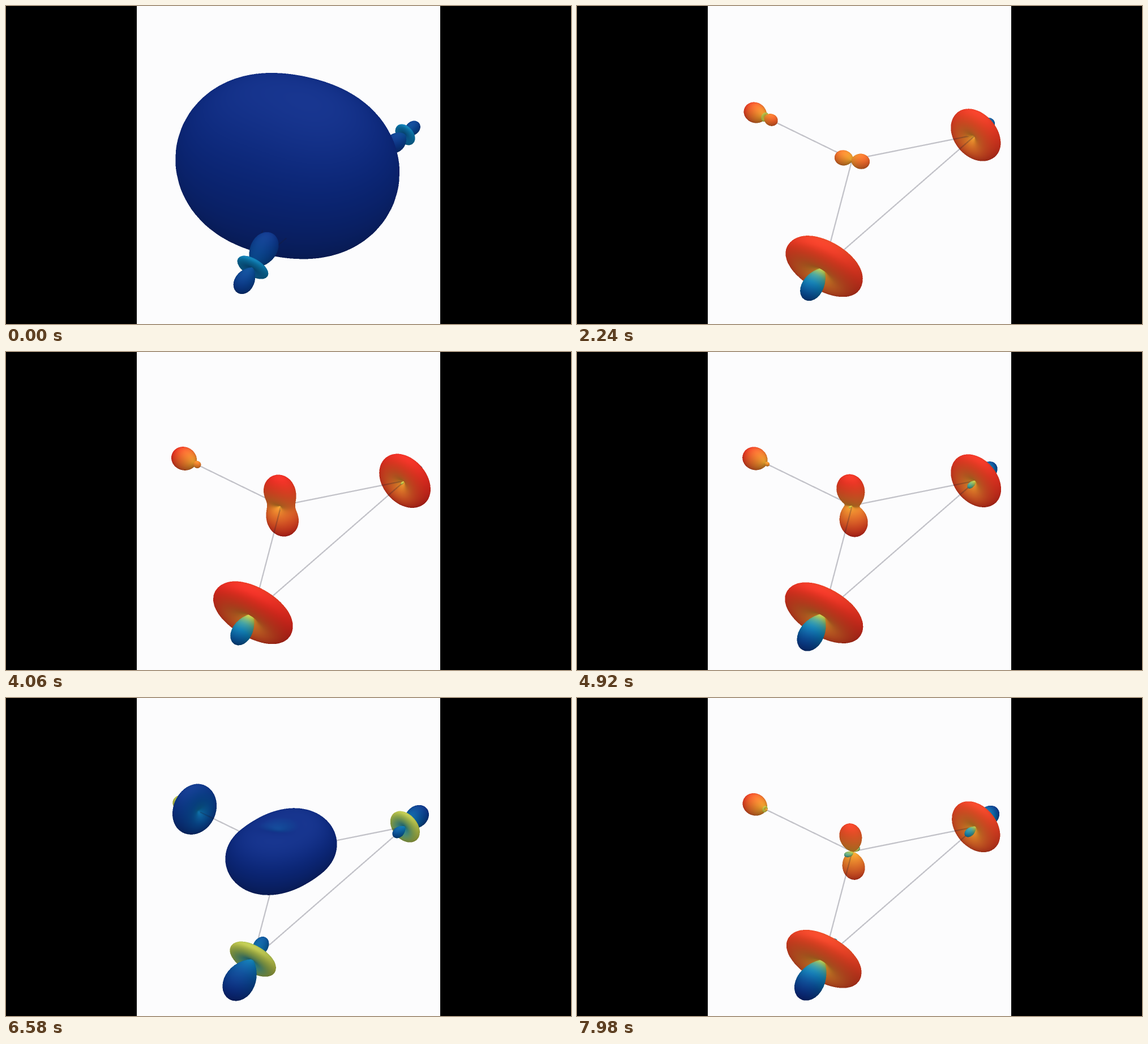
Animation, 998 px wide and 561 px high, one loop 8000 ms. Source, as an HTML page with a canvas:

```html
<!DOCTYPE html>
<html lang="en">
<head>
<meta charset="utf-8">
<title>Surface glyphs</title>
<style>
html, body { margin: 0; width: 100%; height: 100%; overflow: hidden; background: #000; }
canvas { display: block; width: 998px; height: 561px; }
</style>
</head>
<body>
<canvas id="stage" width="998" height="561"></canvas>
<script>
const LOOP = 8000, SS = 2, LEFT = 231, W = 536 * SS, H = 561 * SS;
const ctx = document.getElementById('stage').getContext('2d');
const buf = document.createElement('canvas');
buf.width = W;
buf.height = H;
const bctx = buf.getContext('2d');
const image = bctx.createImageData(W, H);
const px = image.data, px32 = new Uint32Array(px.buffer);
const depth = new Float32Array(W * H);

const dot = (a, b) => a[0] * b[0] + a[1] * b[1] + a[2] * b[2];
const unit = a => a.map(v => v / Math.hypot(...a));
const cross = (a, b) => [a[1] * b[2] - a[2] * b[1], a[2] * b[0] - a[0] * b[2], a[0] * b[1] - a[1] * b[0]];
const mix = (a, b, k) => a + (b - a) * k;
const ramp = (x, a, b) => Math.min(1, Math.max(0, (x - a) / (b - a)));

function basis(axis, side) {
  const u = unit(axis), k = dot(u, side);
  const v = unit(side.map((s, i) => s - k * u[i]));
  return [u, v, cross(u, v)];
}

// Pose: warmth | long and short lobe of the outer pair | left: outer, inner, ring | centre: three axes
const swollen = [.25, .7, .92, -10, -10, -11, -162, -210, -157];
const split = [.88, 1.09, 0, 48, 40, -20, -58, 28, 2];
const ringed = [1, .69, 0, 53, 22, 3, 57, 42, 5];
const warm = [.95, 1.09, .56, 53, 8, -3, 60, 8, -14];
const cold = [.5, 1.09, .6, 53, -12, -46, -42, -86, -106];
const CHANGES = [[17, 29, split], [29, 67, ringed], [67, 117, warm], [106, 125, cold], [157, 172, warm]];

function poseAt(step) {
  const pose = CHANGES.reduce((p, [a, b, next]) => p.map((v, i) => mix(v, next[i], ramp(step, a, b))), swollen);
  const late = ramp(step, 125, 157) * (1 - ramp(step, 157, 172));
  const grow = 1 + .02 * ramp(step, 0, 17) * (1 - ramp(step, 17, 29)) + .1 * late;
  const [heat, long, short, outer, inner, disc, ...axes] = pose;
  return { heat: heat - .04 * late, long, short, side: [outer, inner, disc, disc], core: axes.map(v => v * grow) };
}

// Each shape gives the values along +axis 1, -axis 1, axis 2 and axis 3
const ringSize = (g, heat) => g.size * (.18 + .8 * heat);
function pairShape(g, p) {
  const ring = ringSize(g, p.heat);
  return [-p.long * g.size, -p.short * g.size, ring, ring];
}
const left = {
  at: [332, 196, -100], size: 48, axes: basis([-.62, -.28, -.73], [0, 1, 0]), shape: (g, p) => p.side
};
const centre = {
  at: [486, 271, 0], size: 57, axes: basis([-.09, -.9, .42], [.83, .24, .5]),
  shape: (g, p) => [p.core[0], ...p.core],
  drift: p => .1 * Math.max(0, -p.core[0] - 50)
};
const right = {
  at: [705, 227, -60], size: 55, axes: basis([.59, -.5, -.63], [0, 1, 0]), shape: pairShape
};
const bottom = {
  at: [436, 461, 160], size: 80, axes: basis([-.47, .79, .4], [1, 0, 0]), shape: pairShape
};
const glyphs = [left, centre, right, bottom];
const bonds = [[left, centre], [centre, right], [centre, bottom], [bottom, right]];

const SCALE = [
  [0, 12, 42, 132], [.12, 8, 75, 150], [.25, 12, 125, 180], [.36, 70, 160, 150], [.45, 160, 190, 85],
  [.5, 208, 204, 70], [.6, 245, 165, 45], [.8, 242, 105, 42], [1, 236, 36, 30]
];
function colour(c) {
  let i = 1;
  while (i < SCALE.length - 1 && SCALE[i][0] < c) i++;
  const a = SCALE[i - 1], b = SCALE[i], k = ramp(c, a[0], b[0]);
  return [mix(a[1], b[1], k), mix(a[2], b[2], k), mix(a[3], b[3], k)];
}

// Unit directions of a latitude / longitude grid
const ROWS = 52, COLS = 72, STRIDE = 6;
const dirs = [];
for (let i = 0; i <= ROWS; i++) {
  for (let j = 0; j <= COLS; j++) {
    const th = Math.PI * i / ROWS, ph = 2 * Math.PI * j / COLS;
    dirs.push([Math.cos(th), Math.sin(th) * Math.cos(ph), Math.sin(th) * Math.sin(ph)]);
  }
}
const verts = new Float32Array(dirs.length * STRIDE);
const LIGHT = [0, -.75, .66];

function drawGlyph(g, pose) {
  const [p, q, m, n] = g.shape(g, pose);
  const { heat } = pose, zero = .6 * heat;
  const high = ringSize(g, heat), low = 1.09 * g.size;
  const drift = g.drift ? g.drift(pose) : 0;
  const [u, v, w] = g.axes;
  const toWorld = (a, b, c, i) => a * u[i] + b * v[i] + c * w[i];
  dirs.forEach(([a, b, c], i) => {
    const l = a > 0 ? p : q;
    const f = l * a * a + m * b * b + n * c * c;
    const r = Math.abs(f), s = f < 0 ? -2 : 2;
    // normal of r = |f|: r times the direction minus the tangential gradient
    const na = (r - s * (l - f)) * a, nb = (r - s * (m - f)) * b, nc = (r - s * (n - f)) * c;
    const len = Math.hypot(na, nb, nc) || 1;
    const lit = (toWorld(na, nb, nc, 1) * LIGHT[1] + toWorld(na, nb, nc, 2) * LIGHT[2]) / len;
    const shade = .77 + .23 * lit, gloss = 12 * Math.max(0, lit) ** 3;
    const col = colour(f < 0 ? zero * (1 - Math.min(1, r / low)) : mix(zero, heat, Math.min(1, r / high)));
    const o = i * STRIDE;
    verts[o] = (g.at[0] + drift - LEFT + r * toWorld(a, b, c, 0)) * SS;
    verts[o + 1] = (g.at[1] + drift + r * toWorld(a, b, c, 1)) * SS;
    verts[o + 2] = (g.at[2] + r * toWorld(a, b, c, 2)) * SS;
    for (let k = 0; k < 3; k++) verts[o + 3 + k] = Math.min(255, col[k] * shade + gloss);
  });
  for (let i = 0; i < ROWS; i++) {
    for (let j = 0; j < COLS; j++) {
      const a = i * (COLS + 1) + j, b = a + COLS + 1;
      triangle(a, a + 1, b);
      triangle(a + 1, b + 1, b);
    }
  }
}

function triangle(ia, ib, ic) {
  const V = verts, a = ia * STRIDE, b = ib * STRIDE, c = ic * STRIDE;
  const ax = V[a], ay = V[a + 1], bx = V[b], by = V[b + 1], cx = V[c], cy = V[c + 1];
  const area = (bx - ax) * (cy - ay) - (by - ay) * (cx - ax);
  if (Math.abs(area) < 1e-6) return;
  const x0 = Math.max(0, Math.ceil(Math.min(ax, bx, cx) - .5));
  const x1 = Math.min(W - 1, Math.floor(Math.max(ax, bx, cx) - .5));
  const y0 = Math.max(0, Math.ceil(Math.min(ay, by, cy) - .5));
  const y1 = Math.min(H - 1, Math.floor(Math.max(ay, by, cy) - .5));
  for (let y = y0; y <= y1; y++) {
    for (let x = x0; x <= x1; x++) {
      const X = x + .5, Y = y + .5;
      const kb = ((X - ax) * (cy - ay) - (Y - ay) * (cx - ax)) / area;
      const kc = ((bx - ax) * (Y - ay) - (by - ay) * (X - ax)) / area;
      const ka = 1 - kb - kc;
      if (ka < -1e-5 || kb < -1e-5 || kc < -1e-5) continue;
      const z = ka * V[a + 2] + kb * V[b + 2] + kc * V[c + 2], i = y * W + x;
      if (z <= depth[i]) continue;
      depth[i] = z;
      for (let k = 0; k < 3; k++) px[i * 4 + k] = ka * V[a + 3 + k] + kb * V[b + 3 + k] + kc * V[c + 3 + k];
    }
  }
}

function drawBond([from, to]) {
  const [ax, ay, az] = from.at, [bx, by, bz] = to.at;
  const dx = bx - ax, dy = by - ay, len = Math.hypot(dx, dy), half = 1.15;
  const yStart = Math.floor((Math.min(ay, by) - 2) * SS), yEnd = Math.ceil((Math.max(ay, by) + 2) * SS);
  const reach = half * len / Math.abs(dy);
  for (let y = yStart; y <= yEnd; y++) {
    const Y = (y + .5) / SS, mid = ax + (Y - ay) * dx / dy;
    const xEnd = Math.ceil((mid + reach - LEFT) * SS);
    for (let x = Math.floor((mid - reach - LEFT) * SS); x <= xEnd; x++) {
      const X = (x + .5) / SS + LEFT;
      const t = ((X - ax) * dx + (Y - ay) * dy) / (len * len);
      const off = Math.abs((X - ax) * dy - (Y - ay) * dx) / len;
      if (t < 0 || t > 1 || off > half) continue;
      const i = y * W + x;
      if (mix(az, bz, t) * SS + 1 < depth[i]) continue;
      px[i * 4] = mix(px[i * 4], 25, .25);
      px[i * 4 + 1] = mix(px[i * 4 + 1], 25, .25);
      px[i * 4 + 2] = mix(px[i * 4 + 2], 45, .25);
    }
  }
}

function render(step) {
  const pose = poseAt(step);
  px32.fill(0xfffdfcfc);
  depth.fill(-1e9);
  glyphs.forEach(g => drawGlyph(g, pose));
  bonds.forEach(drawBond);
  bctx.putImageData(image, 0, 0);
  ctx.fillStyle = '#000';
  ctx.fillRect(0, 0, 998, 561);
  ctx.drawImage(buf, LEFT, 0, W / SS, H / SS);
}

// Steps last 20, 100 and 20 ms in turn, with one extra short step
function stepAt(t) {
  const late = t >= 4940, s = late ? t - 20 : t, phase = s % 140;
  return 3 * Math.floor(s / 140) + (phase < 20 ? 0 : phase < 120 ? 1 : 2) + (late ? 1 : 0);
}

const start = performance.now();
let shown = -1;
function tick() {
  const step = stepAt((performance.now() - start) % LOOP);
  if (step !== shown) render(shown = step);
  requestAnimationFrame(tick);
}
tick();
</script>
</body>
</html>
```
